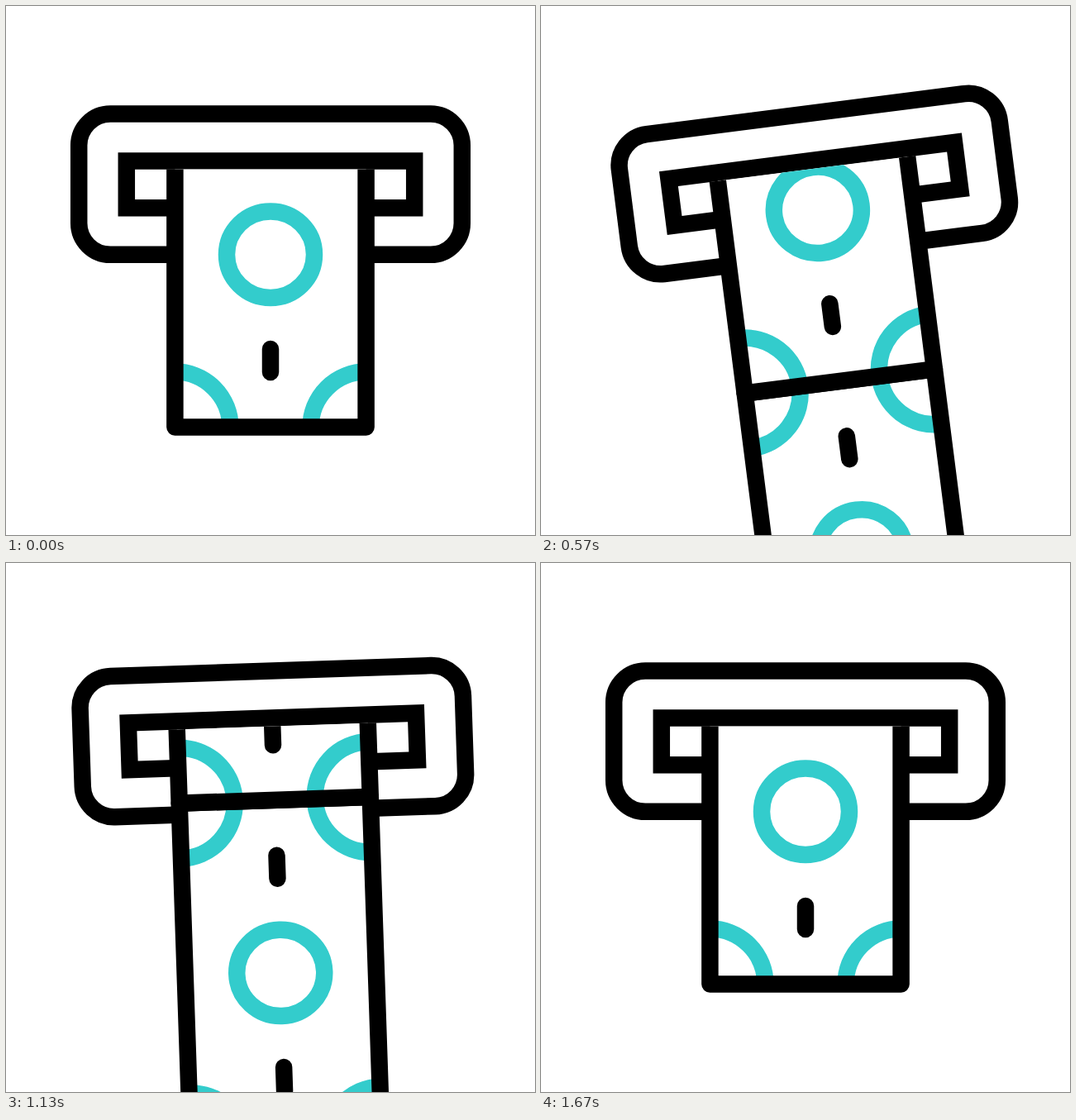
Animation, 640 px wide and 640 px high, one loop 2 s. Source, as an HTML page without scripts:

```html
<!DOCTYPE html>
<html lang="en">
<head>
<meta charset="utf-8">
<title>Cash dispenser</title>
<style>
  @property --t { syntax: "<number>"; inherits: true; initial-value: 0; }

  html, body { margin: 0; width: 100%; height: 100%; overflow: hidden; background: #fff; }

  svg {
    display: block; width: 100%; height: 100%; overflow: hidden;
    animation: tick 2s steps(60) -5ms infinite;

    /* progress of each swing, 0 to 1 */
    --a: clamp(0, var(--t) / 9, 1);
    --b: clamp(0, (var(--t) - 9) / 10, 1);
    --c: clamp(0, (var(--t) - 19) / 7, 1);
    --d: clamp(0, (var(--t) - 26) / 6.5, 1);
    --e: clamp(0, (var(--t) - 32.5) / 6.5, 1);

    /* ticks since the strip tore off */
    --n: max(0, var(--t) - 42);
  }
  @keyframes tick { to { --t: 60; } }

  .swing {
    transform-origin: 320px 130.5px;
    transform: rotate(calc(.5deg * (
      10 * (1 - cos(180deg * var(--a)))
      - 19.1 * (1 - cos(180deg * var(--b)))
      + 14.7 * (1 - cos(180deg * var(--c)))
      - 7.8 * (1 - cos(180deg * var(--d)))
      + 2.2 * (1 - cos(180deg * var(--e))))));
  }

  /* three note lengths of 418 */
  .feed {
    transform: translateY(calc(627px * (1 - cos(min(180deg, .45deg + 3.815deg * var(--t))))));
  }

  .torn {
    transform-origin: 435.5px -744.5px;
    transform: translateY(calc(2.65px * var(--n) * var(--n))) rotate(calc(-2.63deg * var(--n)));
  }

  .ink, .teal { fill: none; stroke: #000; stroke-width: 20.5; }
  .teal { stroke: #33cccc; }
  .dash { stroke-linecap: round; }
  .edge { stroke-linejoin: round; }
</style>
</head>
<body>
<svg viewBox="0 0 640 640" xmlns="http://www.w3.org/2000/svg">
  <defs>
    <clipPath id="slot"><rect x="-600" y="197.5" width="1900" height="2400"/></clipPath>
    <clipPath id="paper"><rect x="204.4" y="91.5" width="231.2" height="418"/></clipPath>
    <g id="note">
      <rect x="204.4" y="91.5" width="231.2" height="418" fill="#fff"/>
      <g class="teal" clip-path="url(#paper)">
        <circle cx="204.4" cy="91.5" r="67"/>
        <circle cx="435.6" cy="91.5" r="67"/>
        <circle cx="204.4" cy="509.5" r="67"/>
        <circle cx="435.6" cy="509.5" r="67"/>
        <ellipse cx="320" cy="300.7" rx="53" ry="52.2"/>
      </g>
      <path class="ink dash" d="M320 158.5v28M320 415v28"/>
      <rect class="ink edge" x="204.4" y="91.5" width="231.2" height="418"/>
    </g>
  </defs>

  <g class="swing">
    <rect class="ink" x="88.2" y="130.6" width="463.6" height="170.2" rx="38"/>
    <rect class="ink" x="145.8" y="187.5" width="348.4" height="56.8"/>
    <g clip-path="url(#slot)">
      <g class="feed">
        <g class="torn">
          <use href="#note"/>
          <use href="#note" y="-418"/>
          <use href="#note" y="-836"/>
        </g>
        <use href="#note" y="-1254"/>
      </g>
    </g>
  </g>
</svg>
</body>
</html>
```
